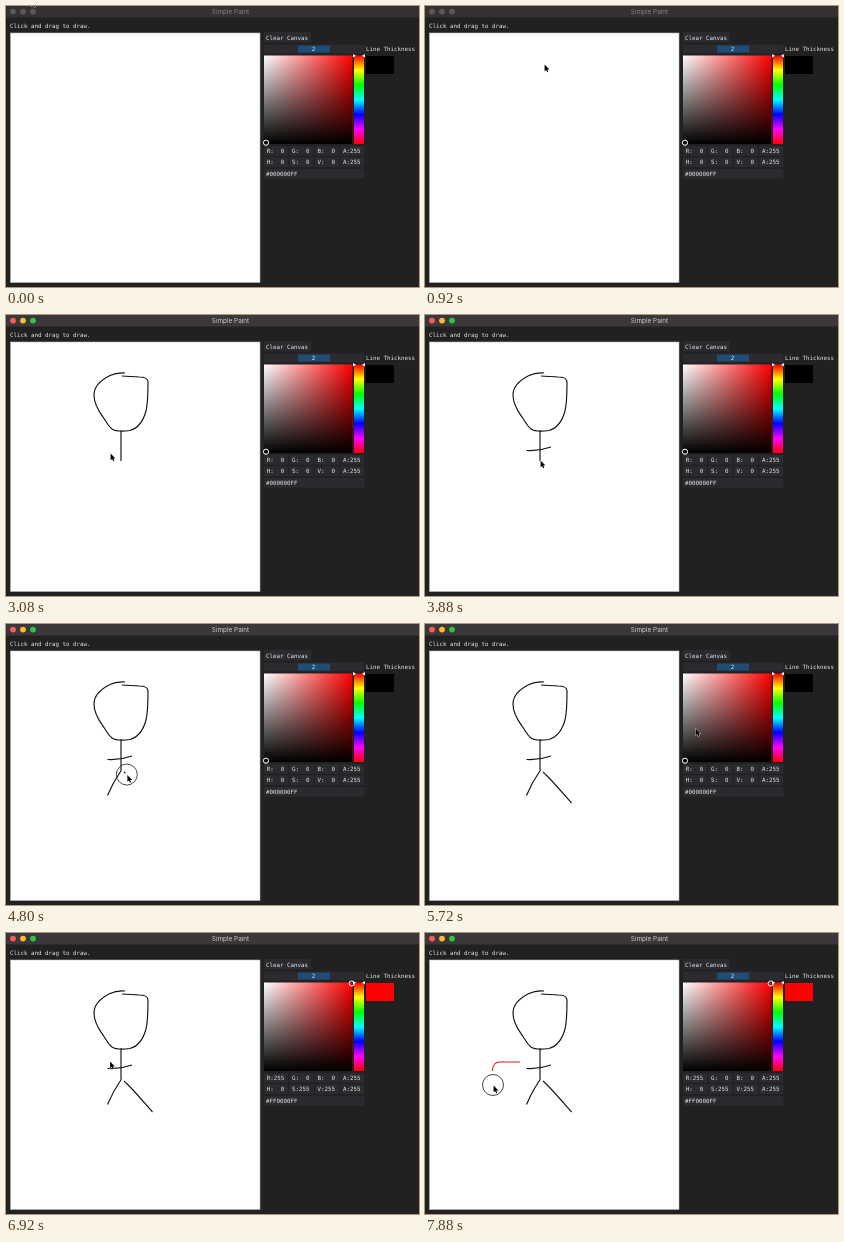
Animation of 413 by 281 pixels, one loop 8000 ms. Source, as an HTML page:

```html
<!DOCTYPE html>
<html>
<head>
<meta charset="utf-8">
<style>
  html, body { margin: 0; width: 100%; height: 100%; overflow: hidden; background: #212121; }
  svg { display: block; }
  text { font: 5.82px "DejaVu Sans Mono", monospace; fill: #e6e6e6; }
  #title { font: 6.4px Inter, sans-serif; text-anchor: middle; }
  .box { fill: #2b2b2f; }
  .line { fill: none; stroke-width: 1.15; stroke-linejoin: round; }
</style>
</head>
<body>
<svg id="stage" width="413" height="281" viewBox="0 0 413 281">
  <defs>
    <linearGradient id="sat"><stop stop-color="#fff"/><stop offset="1" stop-color="#f00"/></linearGradient>
    <linearGradient id="val" x2="0" y2="1"><stop stop-opacity="0"/><stop offset="1"/></linearGradient>
    <linearGradient id="hue" x2="0" y2="1"></linearGradient>
  </defs>
  <rect width="413" height="281" fill="#212121"/>
  <rect id="bar" width="413" height="11.5"/>
  <g id="lights"></g>
  <text id="title" x="224.5" y="8">Simple Paint</text>
  <text x="4" y="22">Click and drag to draw.</text>
  <rect x="4.5" y="27" width="249.5" height="249.5" fill="#fff" stroke="#bbb" stroke-width=".6"/>

  <rect class="box" x="258" y="26" width="47" height="10.5"/>
  <text x="260" y="33.5">Clear Canvas</text>
  <rect class="box" x="258" y="38.5" width="100.5" height="9"/>
  <rect x="292" y="39.5" width="32" height="7" fill="#1f4d75"/>
  <text x="305.8" y="45.2">2</text>
  <text x="360" y="45.2">Line Thickness</text>
  <rect x="258" y="49.5" width="88.5" height="88.5" fill="url(#sat)"/>
  <rect x="258" y="49.5" width="88.5" height="88.5" fill="url(#val)"/>
  <rect x="348" y="49.5" width="10" height="88.5" fill="url(#hue)"/>
  <path d="M347 48l3 1.7-3 1.7zM359 48l-3 1.7 3 1.7z" fill="#fff"/>
  <rect id="swatch" x="360" y="50" width="28" height="18"/>
  <g id="fields"></g>
  <circle id="marker" r="2.6" fill="none" stroke="#fff"/>

  <g id="lines"></g>
  <circle id="ring" r="10.5" fill="none" stroke="#333" stroke-width=".9"/>
  <path id="cursor" d="M0 0V6.8L1.5 5.4 2.6 7.8 3.7 7.3 2.7 5H4.8Z" stroke="#fff" stroke-width=".7" paint-order="stroke"/>
</svg>
<script>
const $ = id => document.getElementById(id);
const add = (parent, tag, attrs, text = '') => {
  const el = document.createElementNS('http://www.w3.org/2000/svg', tag);
  for (const k in attrs) el.setAttribute(k, attrs[k]);
  el.textContent = text;
  return parent.appendChild(el);
};
const clamp = (v, a = 0, b = 1) => Math.min(b, Math.max(a, v));

const LOOP = 8000, FOCUS = 1080, DRAG = [5800, 6290];

// d: path, from/to: pen times, lag: delay of ink behind the pen
const strokes = [
  { d: 'M119 58C112 57.5 108 58.5 104 60.5C96 64.5 88 71 88 80C88 91 95 99 98 103.5C101 108 102 111 106 114C109 116 117 116.5 124 115.5C131 113.5 137 107 140 96C142 88 142 78 142 67C142 63.5 139 62 133 62C128 61.5 122 61.5 116 61',
    from: 1060, to: 1880, lag: 30 },
  { d: 'M115 115.5V146', from: 2640, to: 2920, lag: 30 },
  { d: 'M101.5 135.5C109 136 116 135.5 126 132', from: 3440, to: 3720, lag: 30 },
  { d: 'M115.5 146C110 154 105 163 101.5 171.5', from: 3900, to: 4120, lag: 30 },
  { d: 'M118 148C125 154 135 166 146.5 179', from: 4680, to: 5080, lag: 30, pow: 2 },
  { d: 'M95 129H75Q68 129 67.5 137L68 152', from: 7430, to: 7880, lag: 135, color: '#d81a1a' }
];
for (const s of strokes) {
  s.el = add($('lines'), 'path', { class: 'line', d: s.d, stroke: s.color || '#111' });
  s.len = s.el.getTotalLength();
}
const reach = (s, t) => s.len * clamp((t - s.from) / (s.to - s.from)) ** (s.pow || 1);

// pointer between strokes: time, x, y
const moves = [
  [0, 25, -7], [120, 48, 19], [520, 108, 47], [920, 119, 58],
  [1920, 116, 61], [2520, 115, 116], [2920, 115, 146], [3080, 104, 138],
  [3440, 101, 136], [3720, 126, 132], [3880, 115, 145], [4120, 101, 171],
  [4520, 118, 148], [5080, 146, 179], [5320, 172, 149], [5720, 270, 104],
  [5800, 270, 104], [6280, 346, 50], [6520, 216, 92], [6920, 103.5, 128],
  [7080, 103.5, 128], [7430, 95, 129], [LOOP, 68, 152]
];
function glide(t) {
  const i = moves.findIndex(m => m[0] > t);
  const [t0, x0, y0] = moves[i - 1], [t1, x1, y1] = moves[i];
  const k = (t - t0) / (t1 - t0);
  return { x: x0 + (x1 - x0) * k, y: y0 + (y1 - y0) * k };
}

['#f00', '#ff0', '#0f0', '#0ff', '#00f', '#f0f', '#f00'].forEach((c, i) =>
  add($('hue'), 'stop', { offset: i / 6, 'stop-color': c }));
const lights = [7, 17, 27].map(x => add($('lights'), 'circle', { cx: x, cy: 5.6, r: 2.9 }));

const field = (x, y, w) => {
  add($('fields'), 'rect', { class: 'box', x, y, width: w, height: 9.8 });
  return add($('fields'), 'text', { x: x + 2.7, y: y + 7 });
};
const cells = [...'RGBAHSVA'].map((name, i) =>
  ({ name, el: field(258 + i % 4 * 25.4, i < 4 ? 140 : 151.3, 24.2) }));
const hex = field(258, 162.8, 100.5);
hex.setAttribute('x', 260);

function showColor(t) {
  const p = glide(clamp(t, DRAG[0], 6280));
  const picked = t >= DRAG[0];
  const s = picked ? clamp((p.x - 258) / 87.5) : 0;
  const v = picked ? clamp(1 - (p.y - 50.5) / 87.5) : 0;
  const byte = n => Math.round(n * 255);
  const r = byte(v), g = byte(v * (1 - s));
  const values = [r, g, g, 255, 0, byte(s), byte(v), 255];
  cells.forEach((c, i) => c.el.textContent = c.name + ':' + String(values[i]).padStart(3, '\u00a0'));
  hex.textContent = '#' + [r, g, g, 255].map(n => n.toString(16).padStart(2, '0')).join('').toUpperCase();
  $('swatch').setAttribute('fill', `rgb(${r},${g},${g})`);
  $('marker').setAttribute('cx', clamp(258 + s * 88, 260, 345.7));
  $('marker').setAttribute('cy', clamp(138 - v * 88, 50.5, 136.7));
}

function showWindow(active) {
  $('bar').setAttribute('fill', active ? '#3b373a' : '#353132');
  $('title').style.fill = active ? '#cfcdce' : '#878384';
  ['#fc5b57', '#fdbc2e', '#28c83f'].forEach((c, i) =>
    lights[i].setAttribute('fill', active ? c : '#5c5859'));
}

function draw(t) {
  showWindow(t >= FOCUS);
  showColor(t);
  let pen = glide(t), down = t >= DRAG[0] && t < DRAG[1];
  for (const s of strokes) {
    s.el.style.strokeDasharray = `${reach(s, t - s.lag)} 999`;
    s.el.style.display = t > s.from + s.lag ? '' : 'none';
    if (t >= s.from && t < s.to + 40) {
      pen = s.el.getPointAtLength(reach(s, t));
      down = true;
    }
  }
  const at = (x, y) => `translate(${x} ${y})`;
  $('ring').setAttribute('transform', at(pen.x, pen.y));
  $('ring').style.display = down ? '' : 'none';
  $('cursor').setAttribute('transform', at(pen.x + .6, pen.y + .5));
}

// the screen refreshes at 0, 120 and 280 of every 400 ms
function refresh(t) {
  const r = t % 400;
  return t - r + (r < 120 ? 0 : r < 280 ? 120 : 280);
}

const start = performance.now();
function tick() {
  draw(refresh((performance.now() - start) % LOOP));
  requestAnimationFrame(tick);
}
tick();
</script>
</body>
</html>
```
